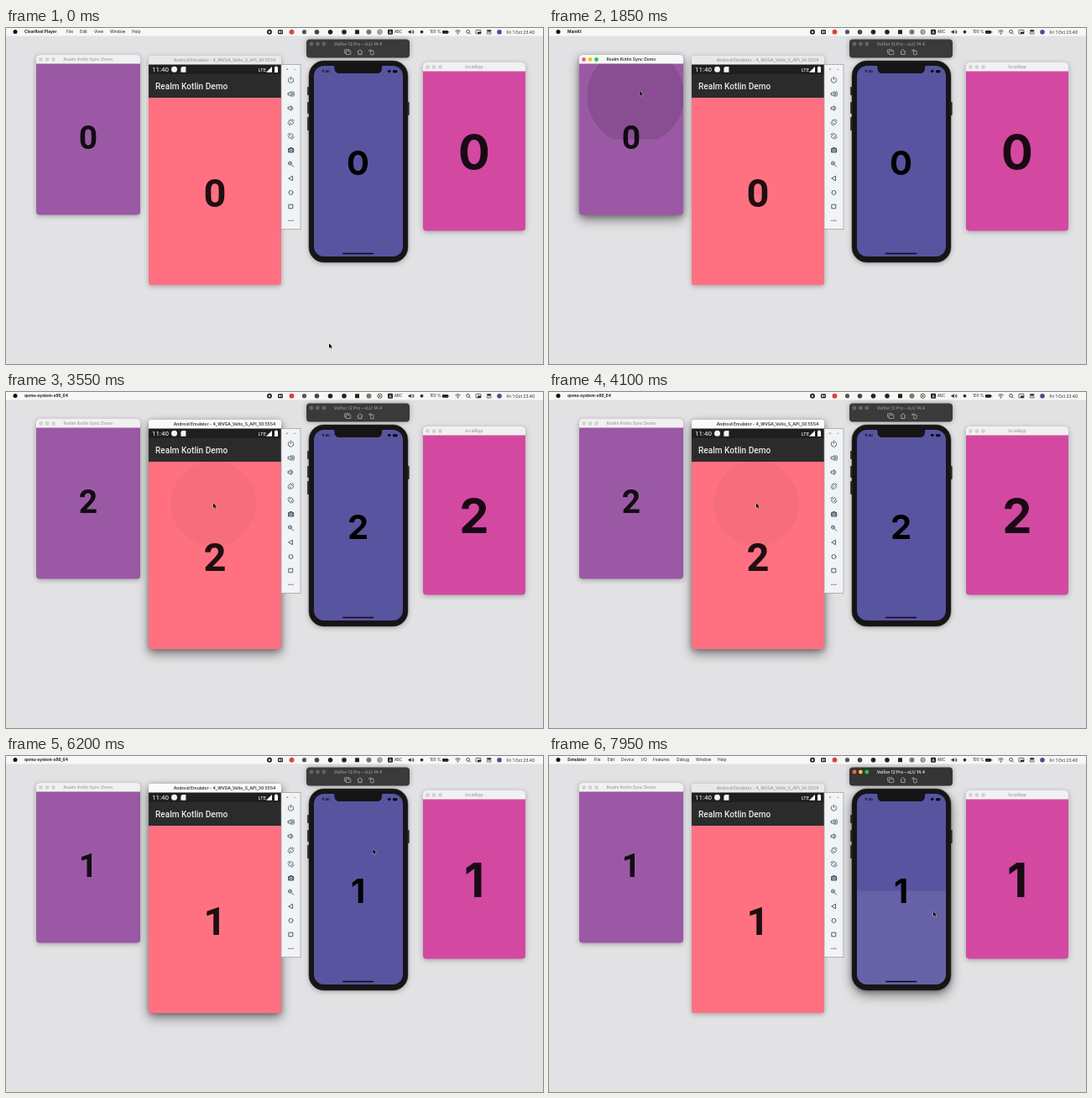
Write an HTML page that moves like this. It is 640 px wide and 400 px high and loops after 8 s.

```html
<!DOCTYPE html>
<html lang="en">
<head>
<meta charset="utf-8">
<style>
  html, body { margin: 0; width: 100%; height: 100%; overflow: hidden; background: #e2e2e4; }
  svg { display: block; width: 640px; height: 400px; }
  text { font-family: Inter, "Open Sans", sans-serif; white-space: pre; }
  .droid { font-family: Roboto, sans-serif; }
  .title { font-size: 5px; font-weight: 600; text-anchor: middle; }
  .count { font-weight: 700; text-anchor: middle; fill: #000; fill-opacity: .88; }
  .line { fill: none; stroke: #48626f; stroke-width: 1; stroke-linecap: round; stroke-linejoin: round; }
</style>
</head>
<body>
<svg id="stage" viewBox="0 0 640 400" xmlns="http://www.w3.org/2000/svg"></svg>
<script>
const LOOP = 8000;
const stage = document.getElementById('stage');

const rect = (x, y, w, h, fill, rx = 0, more = '') =>
  `<rect x="${x}" y="${y}" width="${w}" height="${h}" rx="${rx}" fill="${fill}" ${more}/>`;
const circle = (x, y, r, fill, more = '') => `<circle cx="${x}" cy="${y}" r="${r}" fill="${fill}" ${more}/>`;
const path = (d, more = '') => `<path d="${d}" ${more}/>`;
const text = (x, y, content, more = '') => `<text x="${x}" y="${y}" ${more}>${content}</text>`;
const clip = (id, shape) => `<clipPath id="${id}">${shape}</clipPath>`;
const lights = (id, x, y, gap) => `<g id="${id}">${[0, 1, 2].map(i => circle(x + i * gap, y, 2.4, '#d2d2d2')).join('')}</g>`;
const shadow = (id, x, y, w, h, rx) =>
  rect(x, y + 1.5, w, h, '#000', rx, 'opacity=".28" filter="url(#soft)"') +
  rect(x, y + 6, w, h, '#000', rx, `id="${id}" opacity="0" filter="url(#deep)"`);

const topWindow = (id, x, y, w, h, color, title) =>
  shadow(id + 'Shadow', x, y, w, h, 4) +
  rect(x, y, w, h, color, 4) +
  path(`M${x} ${y + 10.5}v-6.5a4 4 0 0 1 4-4h${w - 8}a4 4 0 0 1 4 4v6.5z`, `id="${id}Bar" fill="#f1f1f1"`) +
  lights(id + 'Lights', x + 5.5, y + 5.5, 7.5) +
  text(x + w / 2, y + 7.3, title, `id="${id}Title" class="title" fill="#a6a6a6"`);

const ripple = (id, clipId) => `<g clip-path="url(#${clipId})">${circle(0, 0, 1, '#000', `id="${id}" opacity="0"`)}</g>`;

function menuBar() {
  const ink = 'fill="none" stroke="#222" stroke-width=".8"';
  return rect(0, 0, 640, 9.5, '#f7f7f8') +
    circle(11, 4.6, 2.5, '#111') +
    '<g id="menu" font-size="4.8" fill="#222"></g>' +
    circle(314, 4.7, 2.9, '#222') + rect(313, 3.7, 2, 2, '#f7f7f8', .3) +
    rect(324, 2.2, 6, 5, '#222', 1.2) + path('M325.3 3.7h2v2h-2zM327.8 4.3l1.2-.6v2l-1.2-.6z', 'fill="#fff"') +
    circle(340.5, 4.7, 2.9, '#d6453e') +
    circle(355.5, 4.7, 2.6, '#555') +
    circle(370.5, 4.7, 2.8, '#444') +
    circle(386.5, 4.7, 2.8, '#222') +
    circle(403, 4.7, 2.8, '#222') +
    rect(416, 2.2, 5, 5, '#222', .5) +
    circle(432.5, 4.7, 3, '#64845f') +
    circle(445.5, 4.7, 2.6, 'none', ink) + path('M444.7 3.4v2.6l2.1-1.3z', 'fill="#222"') +
    rect(455, 1.8, 6, 6, '#222', 1) + text(458, 6.5, 'A', 'font-size="5" fill="#fff" text-anchor="middle"') +
    text(463, 6.3, 'ABC', 'font-size="4.4" fill="#222"') +
    path('M479.5 3.8h1.3l1.9-1.6v5l-1.9-1.6h-1.3z', 'fill="#222"') + path('M484 3.3q1.1 1.4 0 2.8M485.2 2.5q1.8 2.2 0 4.4', ink) +
    circle(495.5, 4.7, 1.9, '#333') +
    text(505, 6.4, '100 %', 'font-size="4.6" fill="#222"') +
    rect(520, 2.9, 7, 3.8, '#222', .9) + rect(527.5, 4, .7, 1.6, '#222') +
    path('M535.4 4a4.4 4.4 0 0 1 6.2 0M536.6 5.3a2.8 2.8 0 0 1 3.8 0', ink) + circle(538.5, 6.7, .7, '#222') +
    circle(550.6, 4.3, 1.9, 'none', ink) + path('M552 5.7l1.6 1.6', ink) +
    rect(560, 2.4, 6, 4.5, 'none', .7, 'stroke="#222" stroke-width=".7"') + rect(562, 4.4, 4, 2.4, '#222', .5) +
    rect(573, 2.2, 5.4, 2, '#222', 1) + rect(573, 5.1, 5.4, 2, 'none', 1, 'stroke="#222" stroke-width=".6"') +
    circle(588, 4.7, 2.8, '#4b4c8c') +
    text(596.5, 6.5, 'Fri 1 Oct 23.40', 'font-size="4.9" fill="#222"');
}

function emulator() {
  const row = (y, d) => path(d, `class="line" transform="translate(339.5 ${y})"`);
  const speaker = 'M-3-1.2h1.5l2-1.8v6l-2-1.8h-1.5z';
  return shadow('droidShadow', 170, 33, 158, 273, 3) +
    rect(170, 55, 158, 251, '#ff7181', 3) +
    path('M170 44v-8a3 3 0 0 1 3-3h152a3 3 0 0 1 3 3v8z', 'id="droidBar" fill="#e9e9e9"') +
    text(260.5, 40, 'Android Emulator - 4_WVGA_Velto_S_API_30:5554', 'id="droidTitle" class="title" fill="#a0a0a0"') +
    rect(170, 43.5, 158, 12, '#1f1f1f') + rect(170, 55, 158, 28, '#2b2b2b') +
    text(174, 52.3, '11:40', 'class="droid" font-size="8" fill="#fff"') +
    circle(200.5, 49.3, 3.5, '#f4f4f4') +
    path('M210 46h4.4v6.8h-6v-5.2z', 'fill="#f4f4f4"') +
    text(300.5, 52, 'LTE', 'class="droid" font-size="6.2" fill="#fff"') +
    path('M317 46v6.8h-7z', 'fill="#fff"') +
    rect(320, 46.3, 4, 6.7, '#fff', .5) + rect(321.2, 45.5, 1.6, 1, '#fff') +
    text(178, 72.8, 'Realm Kotlin Demo', 'class="droid" font-size="10.1" font-weight="500" fill="#e9e9e9"') +
    ripple('droidUp', 'droidTop') + ripple('droidDown', 'droidBottom') +
    text(249, 213.3, '0', 'id="n1" class="count droid" font-size="47"') +
    rect(328, 43.5, 23, 196, '#f2f3f5', 0, 'stroke="#9a9a9a" stroke-width=".7"') +
    path('M334 48.2l2 2m0-2l-2 2M343.2 49.3h2.2', 'stroke="#777" stroke-width=".6"') +
    row(61.5, 'M-1.8-2.2a3.2 3.2 0 1 0 3.6 0M0-3.4v3.2') +
    row(78.5, speaker + 'M1.8-1.8q1.6 1.8 0 3.6M2.7-3.2q3 3.2 0 6.4') +
    row(95.5, speaker + 'M1.8-1.4q1.2 1.4 0 2.8') +
    row(112, 'M-2.5-1l2-2 3.8 3.8-2 2zM-3.6 1a4 4 0 0 0 3 2.8M3.6-1.4a4 4 0 0 0-2-2') +
    row(128.5, 'M2.5-1l-2-2-3.8 3.8 2 2zM3.6 1a4 4 0 0 1-3 2.8M-3.6-1.4a4 4 0 0 1 2-2') +
    rect(336, 143, 7.2, 5.4, '#48626f', .8) + rect(338, 142, 3.2, 1.4, '#48626f') + circle(339.6, 145.7, 1.5, '#48626f', 'stroke="#fff" stroke-width=".7"') +
    row(162, 'M1-1a2 2 0 1 1-4 0a2 2 0 1 1 4 0M.6.6l2.6 2.6M-1.8-1h1.6') +
    row(179.2, 'M2-2.6v5.2l-4.4-2.6z') +
    row(196, 'M2.5 0a2.5 2.5 0 1 1-5 0a2.5 2.5 0 1 1 5 0') +
    row(212.5, 'M-2.3-2.3h4.6v4.6h-4.6z') +
    [-2.4, 0, 2.4].map(d => circle(339.5 + d, 229.3, .75, '#48626f')).join('');
}

function phone() {
  const icon = 'fill="none" stroke="#bbb" stroke-width=".8"';
  return shadow('phoneShadow', 361, 39, 118, 240, 18) +
    rect(358, 13.5, 123, 22, '#000', 4, 'opacity=".3" filter="url(#soft)"') +
    rect(358, 13.5, 123, 22, '#3a3a3b', 4, 'id="phoneBar"') + lights('phoneLights', 364, 19, 7.4) +
    text(419.5, 20.8, 'Velfon 12 Pro – eLU 14.4', 'id="phoneTitle" class="title" fill="#8f8f8f"') +
    rect(403.5, 25.7, 5.6, 4.3, 'none', .6, 'stroke="#bbb" stroke-width=".7"') + rect(405.2, 27.2, 5.6, 4.3, '#3a3a3b', .6, 'stroke="#bbb" stroke-width=".7"') +
    path('M418.7 28.6l3.2-3 3.2 3M419.8 28v3.5h4.2v-3.5', icon) +
    rect(434.6, 27.2, 3.6, 4.6, 'none', .5, 'stroke="#bbb" stroke-width=".7"') + path('M433 28v-1.8h3', icon) +
    [[359.2, 70, 10], [359.2, 88, 14], [359.2, 106, 16], [478, 88, 16]].map(([x, y, h]) => rect(x, y, 2.6, h, '#222', .8)).join('') +
    rect(361, 39, 118, 240, '#151516', 18, 'stroke="#3c3c3e" stroke-width=".6"') +
    rect(367, 45, 106, 227, '#5954a0', 12) +
    `<g clip-path="url(#screen)">${rect(367, 45, 106, 115.5, '#fff', 0, 'id="glowUp"')}${rect(367, 160.5, 106, 112, '#fff', 0, 'id="glowDown"')}</g>` +
    path('M389.5 44.5q2 .4 2 2.5v1.5a5.5 5.5 0 0 0 5.5 5.5h45.5a5.5 5.5 0 0 0 5.5-5.5v-1.5q0-2.1 2-2.5z', 'fill="#151516"') +
    text(381, 53.4, '11:40', 'font-size="3.9" font-weight="600" text-anchor="middle"') +
    path('M454.6 51.3a3 3 0 0 1 4.4 0l-2.2 2.3z') + rect(461, 50.3, 5.4, 2.9, '#000', .8) +
    rect(401, 267.8, 37.5, 1.5, '#0a0a14', .75) +
    text(419.6, 175.2, '0', 'id="n2" class="count" style="fill-opacity:1" font-size="40"');
}

stage.innerHTML = `<defs>
  <filter id="soft" x="-20%" y="-20%" width="140%" height="140%"><feGaussianBlur stdDeviation="3"/></filter>
  <filter id="deep" x="-30%" y="-30%" width="160%" height="160%"><feGaussianBlur stdDeviation="7"/></filter>
  ${clip('deskTop', rect(36, 42.5, 124, 90, '#000'))}
  ${clip('droidTop', rect(170, 83, 158, 111.5, '#000'))}
  ${clip('droidBottom', path('M170 194.5h158v108.5a3 3 0 0 1-3 3h-152a3 3 0 0 1-3-3z'))}
  ${clip('screen', rect(367, 45, 106, 227, '#000', 12))}
</defs>` +
  rect(0, 0, 640, 400, '#e2e2e4') + menuBar() +
  topWindow('desk', 36, 32, 124, 190.5, '#9b59a5', 'Realm Kotlin Sync Demo') +
  ripple('deskUp', 'deskTop') +
  text(98, 143.5, '0', 'id="n0" class="count droid" font-size="39"') +
  topWindow('local', 497, 41, 122, 200.5, '#d349a2', 'localApp') +
  text(558, 168.2, '0', 'id="n3" class="count" font-size="56"') +
  emulator() + phone() +
  path('M0 0v5.4l1.3-1.1.9 2 1-.4-.9-2h1.7z', 'id="cursor" fill="#000" stroke="#fff" stroke-width=".6" paint-order="stroke"');

const $ = id => document.getElementById(id);
const clamp = v => Math.min(1, Math.max(0, v));
const mix = (a, b, k) => a + (b - a) * k;
const smooth = k => k * k * (3 - 2 * k);
const lastBefore = (list, t) => list.filter(([at]) => at <= t).pop()[1];

const focus = [[0, ''], [1000, 'desk'], [2600, 'droid'], [6240, 'phone']];
const counts = [[0, 0], [1890, 1], [3540, 2], [4110, 3], [4890, 2], [5510, 1], [6340, 2], [6890, 3], [7440, 2], [7790, 1]];
// start, end, x, y
const moves = [[0, 0, 385, 375.5], [20, 800, 108, 75], [2210, 2350, 247, 132.5], [4420, 4700, 265, 254], [5960, 6190, 437.3, 111], [7080, 7300, 458, 185.3]];
const taps = {
  deskUp: { at: [1760], from: [108, 75], box: [36, 42.5, 124, 90] },
  droidUp: { at: [3530, 4080], from: [247, 132.5], box: [170, 83, 158, 111.5] },
  droidDown: { at: [4852, 5480], from: [265, 254], box: [170, 194.5, 158, 111.5] }
};
// press, release
const presses = { glowUp: [[6240, 6330], [6740, 6895]], glowDown: [[7350, 7430], [7745, 7800]] };
const menus = {
  '': ['ClearReel Player', { File: 72, Edit: 88, View: 105, Window: 124, Help: 150 }],
  desk: ['MainKt', {}],
  droid: ['qemu-system-x86_64', {}],
  phone: ['Simulator', { File: 53.5, Edit: 69.5, Device: 86, 'I/O': 110, Features: 124, Debug: 152, Window: 175, Help: 201 }]
};
const looks = {
  desk: ['#f1f1f1', '#f8f8f8', '#a6a6a6', '#333'],
  droid: ['#e9e9e9', '#fafafa', '#a0a0a0', '#333'],
  phone: ['#3a3a3b', '#343435', '#8f8f8f', '#e2e2e2']
};

let shown = null;
function setFocus(active) {
  if (active === shown) return;
  shown = active;
  const [name, items] = menus[active];
  $('menu').innerHTML = text(22, 6.4, name, 'font-weight="700"') +
    Object.entries(items).map(([label, x]) => text(x, 6.4, label)).join('');
  for (const [id, look] of Object.entries(looks)) {
    const on = id === active;
    $(id + 'Bar').setAttribute('fill', look[+on]);
    $(id + 'Title').setAttribute('fill', look[2 + on]);
    $(id + 'Shadow').setAttribute('opacity', on ? .42 : 0);
    const dots = $(id + 'Lights');
    if (dots) [...dots.children].forEach((dot, i) =>
      dot.setAttribute('fill', on ? ['#ff5f57', '#febc2e', '#28c840'][i] : id === 'phone' ? '#646465' : '#d2d2d2'));
  }
}

function drawRipple(id, { at, from, box: [x, y, w, h] }, t) {
  const age = t - (at.filter(s => s <= t).pop() ?? -LOOP);
  const k = smooth(Math.sqrt(clamp(age / 225)) * clamp(age / 225) ** .3);
  const node = $(id);
  node.setAttribute('cx', mix(from[0], x + w / 2, k));
  node.setAttribute('cy', mix(from[1], y + h / 2, k));
  node.setAttribute('r', mix(.3 * Math.max(w, h), Math.hypot(w, h) / 2 + 4, k));
  node.setAttribute('opacity', .12 * clamp(age / 75) * clamp((300 - age) / 100));
}

function draw(t) {
  setFocus(lastBefore(focus, t));
  const value = lastBefore(counts, t);
  for (let i = 0; i < 4; i++) $('n' + i).textContent = value;
  for (const [id, tap] of Object.entries(taps)) drawRipple(id, tap, t);
  for (const [id, list] of Object.entries(presses)) {
    const last = list.filter(([down]) => down <= t).pop();
    $(id).setAttribute('opacity', last ? .25 * clamp(1 - (t - last[1]) / 225) : 0);
  }
  let x = 0, y = 0;
  for (const [start, end, toX, toY] of moves) {
    const k = end ? smooth(clamp((t - start) / (end - start))) : 1;
    x = mix(x, toX, k);
    y = mix(y, toY, k);
  }
  $('cursor').setAttribute('transform', `translate(${x} ${y})`);
}

const begin = performance.now();
function tick() {
  draw((performance.now() - begin) % LOOP);
  requestAnimationFrame(tick);
}
tick();
</script>
</body>
</html>
```
